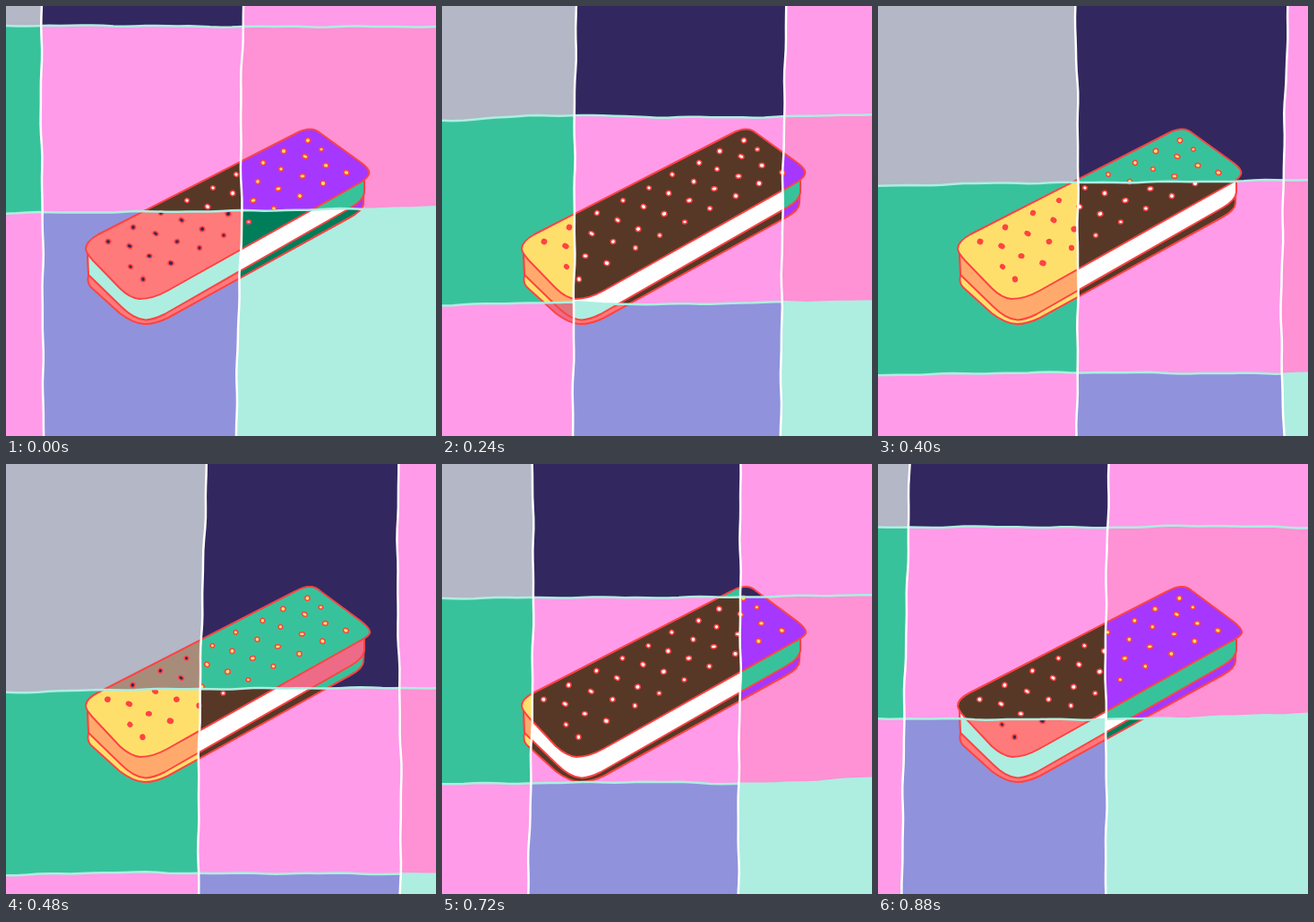
Recreate the animation shown at these times as an HTML page. Size 480 by 480 pixels, loop 0.96 s.

```html
<!DOCTYPE html>
<html lang="en">
<head>
<meta charset="utf-8">
<title>Ice cream sandwich</title>
<style>
html, body { margin: 0; width: 100%; height: 100%; overflow: hidden; background: #ff9be9; }
svg { display: block; width: 100vw; height: 100vh; }
</style>
</head>
<body>
<svg id="stage" viewBox="0 0 480 480" xmlns="http://www.w3.org/2000/svg"></svg>
<script>
const LOOP = 960, STEP = 80;
const RED = '#ff4343', MINT = '#adeee1', PINK = '#ff9be9', NAVY = '#32285f',
  GREEN = '#38c29b', YELLOW = '#ffdf6c', ROSE = '#ff91d5', BROWN = '#573827',
  CORAL = '#ff7a7a', WHITE = '#ffffff', FOREST = '#007d59';

// background, wafer, cream, sprinkle; row by row
const CELLS = [
  ['#b3b7c6', '#a88c7a', WHITE, NAVY],
  [NAVY, GREEN, '#ed6b87', YELLOW],
  [PINK, NAVY, ROSE, YELLOW],
  [GREEN, YELLOW, '#ffaa6c', RED],
  [PINK, BROWN, WHITE, WHITE],
  [ROSE, '#a637ff', GREEN, YELLOW],
  [PINK, '#ed6b87', '#dc777e', RED],
  ['#9092dc', CORAL, MINT, NAVY],
  [MINT, FOREST, WHITE, PINK]
];

// Each rule is sampled at 0, 120, 240, 360 and 480 along its length.
const POSES = {
  0: { v1: [40, 39, 41, 41, 42], v2: [265, 262, 263, 259, 257], h1: [22, 22, 23, 23, 23], h2: [231, 230, 229, 227, 225] },
  3: { v1: [150, 148, 148, 147, 146], v2: [384, 382, 380, 379, 378], h1: [128, 122, 124, 124, 121], h2: [334, 331, 333, 331, 330] },
  4: { v1: [183, 186, 186, 186, 185], v2: [421, 417, 415, 413, 416], h1: [164, 161, 160, 159, 157], h2: [375, 373, 372, 373, 373] },
  6: { v1: [224, 220, 217, 215, 215], v2: [438, 437, 439, 441, 440], h1: [255, 252, 251, 250, 250], h2: [459, 456, 457, 457, 458] },
  7: { v1: [186, 181, 178, 175, 174], v2: [402, 400, 401, 401, 402], h1: [220, 217, 213, 214, 211], h2: [426, 424, 424, 424, 422] },
  9: { v1: [101, 102, 101, 99, 96], v2: [333, 333, 333, 331, 331], h1: [150, 149, 149, 148, 146], h2: [357, 356, 355, 357, 351] },
  11: { v1: [35, 33, 30, 28, 27], v2: [258, 255, 254, 255, 254], h1: [71, 70, 71, 69, 71], h2: [284, 285, 285, 283, 279] }
};

const mapPose = (pose, fn) =>
  Object.fromEntries(Object.keys(pose).map(n => [n, pose[n].map((v, i) => fn(v, n, i))]));
const mix = (a, b, p) => mapPose(a, (v, n, i) => v + (b[n][i] - v) * p);
POSES[1] = mix(POSES[0], POSES[3], 1 / 3);
POSES[2] = mix(POSES[0], POSES[3], 2 / 3);
POSES[5] = mapPose(POSES[4], v => v + 37);
POSES[8] = mix(POSES[7], POSES[9], 0.5);
POSES[10] = mix(POSES[9], POSES[11], 0.5);

const SPRINKLES = [
  337, 150, 352, 160, 310, 162, 334, 168, 287, 175, 307, 182, 357, 178, 380, 186, 257, 188,
  281, 196, 331, 190, 354, 198, 231, 203, 253, 209, 304, 204, 328, 212, 202, 217, 225, 224,
  276, 217, 299, 226, 173, 231, 196, 239, 248, 232, 271, 241, 142, 247, 167, 254, 219, 249,
  243, 256, 114, 263, 138, 268, 191, 263, 216, 270, 160, 279, 184, 287, 139, 291, 153, 305
];

const BASE = 'M91 274 L92 301 Q90 309 95 314 L127 343 Q143 355 155 355 Q167 355 181 348 L384 236 Q399 228 399 220 L400 192 Z';
const CREAM = 'M91 272 L92 300 L128 335 Q143 350 156 350.5 Q165 350 177 344 L385 225 Q399 217 400 208 L400 191 Z';
const TOPS = [
  'M89 271 Q89 263 103 255 L324 142 Q341 133 351 142 L398 176 Q407 183 405 188 Q403 193 394 198 L180 318 Q164 327 149 327 Q138 326 127 315 L97 284 Q89 275 89 271 Z',
  'M89 270 Q89 262 103 255 L323 142 Q341 132 351 142 L397 176 Q408 185 406 189 Q404 193 394 198 L180 318 Q164 327 150 327 Q139 326 127 315 L97 283 Q89 274 89 270 Z'
];

const stage = document.getElementById('stage');
function el(name, attrs, parent) {
  const node = document.createElementNS('http://www.w3.org/2000/svg', name);
  for (const key in attrs) node.setAttribute(key, attrs[key]);
  return parent.appendChild(node);
}

const defs = el('defs', {}, stage);
const clip = id => el('path', {}, el('clipPath', { id }, defs));
const colClips = [0, 1, 2].map(i => clip('col' + i));
const rowClips = [0, 1, 2].map(i => clip('row' + i));

const tops = [], dots = [];
CELLS.forEach(([bg, wafer, cream, dot], i) => {
  const col = el('g', { 'clip-path': `url(#col${i % 3})` }, stage);
  const cell = el('g', { 'clip-path': `url(#row${Math.floor(i / 3)})` }, col);
  el('rect', { width: 480, height: 480, fill: bg }, cell);
  const bar = el('g', { stroke: RED, 'stroke-width': 2, 'stroke-linejoin': 'round' }, cell);
  el('path', { d: BASE, fill: wafer }, bar);
  el('path', { d: CREAM, fill: cream }, bar);
  tops.push(el('path', { fill: wafer }, bar));
  const group = el('g', { fill: dot, 'stroke-width': 1.5 }, bar);
  for (let s = 0; s < SPRINKLES.length; s += 2) {
    const x = SPRINKLES[s], y = SPRINKLES[s + 1];
    el('ellipse', {
      cx: x, cy: y, rx: 2.7 + 0.4 * Math.sin(s * 2.3), ry: 2.4 + 0.3 * Math.cos(s * 1.7),
      transform: `rotate(${(s * 37) % 60 - 20} ${x} ${y})`
    }, group);
  }
  dots.push(group);
});

const rule = color => el('path', { fill: 'none', stroke: color, 'stroke-width': 2.5, 'stroke-linejoin': 'round' }, stage);
const rules = { h1: rule(MINT), h2: rule(MINT), v1: rule(WHITE), v2: rule(WHITE) };

// Catmull-Rom through the samples, with a slight hand-drawn wobble
function curve(vals, seed) {
  const out = [];
  for (let s = 0; s <= 480; s += 12) {
    const i = Math.min(3, Math.floor(s / 120)), u = s / 120 - i;
    const b = vals[i], c = vals[i + 1], a = vals[i - 1] ?? b, d = vals[i + 2] ?? c;
    const smooth = b + 0.5 * u * (c - a + u * (2 * a - 5 * b + 4 * c - d + u * (3 * (b - c) + d - a)));
    out.push([s, smooth + 0.45 * Math.sin(s / 17 + seed * 2.1) + 0.3 * Math.sin(s / 9 + seed)]);
  }
  return out;
}

const flat = v => [[-1, v], [481, v]];
const join = (pts, upright) => pts.map(([s, v]) => {
  const a = s.toFixed(1), b = v.toFixed(2);
  return upright ? b + ' ' + a : a + ' ' + b;
}).join('L');

function setBands(clips, first, second, upright) {
  const edges = [flat(-2), first, second, flat(482)];
  clips.forEach((path, i) => {
    const pts = edges[i].concat(edges[i + 1].slice().reverse());
    path.setAttribute('d', 'M' + join(pts, upright) + 'Z');
  });
}

function draw(step) {
  const pose = POSES[step], lines = {};
  Object.keys(rules).forEach((name, i) => {
    lines[name] = curve(pose[name], step * 4 + i);
    rules[name].setAttribute('d', 'M' + join(lines[name], name[0] === 'v'));
  });
  setBands(colClips, lines.v1, lines.v2, true);
  setBands(rowClips, lines.h1, lines.h2, false);
  const half = step < 6 ? 0 : 1;
  tops.forEach(path => path.setAttribute('d', TOPS[half]));
  dots.forEach(group => group.setAttribute('transform', `translate(${-0.6 * half} ${-0.2 * half})`));
}

const start = performance.now();
let shown = -1;
function tick() {
  const step = Math.floor(((performance.now() - start) % LOOP) / STEP);
  if (step !== shown) draw(shown = step);
  requestAnimationFrame(tick);
}
tick();
</script>
</body>
</html>
```
